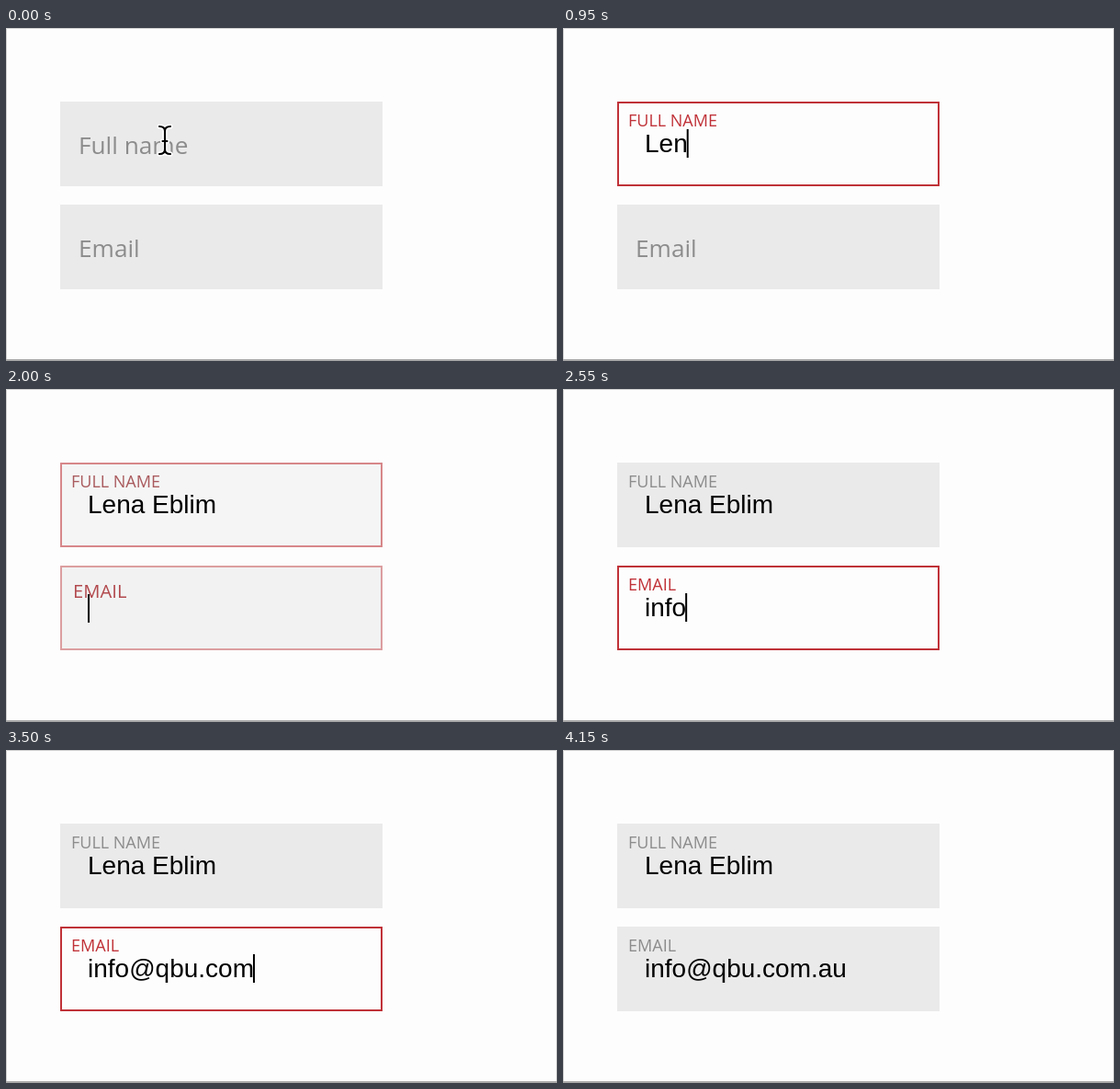
Animation, 600 px wide and 362 px high, one loop 4.4 s. Source, as an HTML page:

```html
<!DOCTYPE html>
<html lang="en">
<head>
<meta charset="utf-8">
<title>Floating form labels</title>
<style>
  html, body { margin: 0; width: 100%; height: 100%; overflow: hidden; background: #fdfdfd; }
  svg { display: block; width: 100%; height: 100%; }
  .label { font-family: "Open Sans", "Noto Sans", sans-serif; font-weight: 500; }
  .value { font: 28px "Liberation Sans", Arial, sans-serif; white-space: pre; }
  .outline { fill: none; stroke: #c03238; stroke-width: 2; }
  .beam { fill: none; stroke-linecap: round; stroke-linejoin: round; }
</style>
</head>
<body>
<svg id="stage" viewBox="0 0 600 362">
  <rect width="600" height="362" fill="#fdfdfd"/>
  <path d="M.5 362V.5H599.5V362" fill="none" stroke="#d2d2d2"/>
  <rect y="360" width="600" height="2" fill="#a9a9a9"/>
  <g id="fields"></g>
  <g id="pointer">
    <path id="beam" class="beam" stroke="#fff" stroke-width="5"
      d="M167 107Q173 107 173 112V132Q173 137 167 137M179 107Q173 107 173 112M173 132Q173 137 179 137M170.5 123H175.5"/>
    <use href="#beam"/>
    <path class="beam" stroke="#000" stroke-width="2.1"
      d="M167 107Q173 107 173 112V132Q173 137 167 137M179 107Q173 107 173 112M173 132Q173 137 179 137M170.5 123H175.5"/>
  </g>
</svg>
<script>
const LOOP = 4400, STEP = 50, FADE = 250, POINTER_HIDES = 500;
const GREY = [140, 140, 140], RED = [192, 50, 56];
const IDLE = [234, 234, 234], ACTIVE = [253, 253, 253];

const specs = [
  { y: 80, label: "Full name", text: "Lena Eblim", focus: 50, blur: 1890,
    keys: [550, 750, 950, 1100, 1200, 1350, 1450, 1550, 1650, 1750] },
  { y: 192, label: "Email", text: "info@qbu.com.au", focus: 1890, blur: 3890,
    keys: [2300, 2400, 2500, 2550, 2700, 2800, 2900, 3050, 3200, 3250, 3350, 3500, 3600, 3750, 3850] }
];

const clamp = v => Math.min(1, Math.max(0, v));
const lerp = (a, b, p) => a + (b - a) * p;
const mix = (a, b, p) => `rgb(${a.map((v, i) => Math.round(lerp(v, b[i], p)))})`;

// CSS "ease": cubic-bezier(.25, .1, .25, 1)
function ease(p) {
  const bezier = (a, b, u) => 3 * a * u * (1 - u) ** 2 + 3 * b * u * u * (1 - u) + u ** 3;
  let lo = 0, hi = 1;
  for (let i = 0; i < 20; i++) {
    const mid = (lo + hi) / 2;
    if (bezier(.25, .25, mid) < p) lo = mid; else hi = mid;
  }
  return bezier(.1, 1, lo);
}

function set(node, attrs) {
  for (const name in attrs) node.setAttribute(name, attrs[name]);
}

function add(parent, tag, attrs) {
  const node = document.createElementNS("http://www.w3.org/2000/svg", tag);
  set(node, attrs);
  return parent.appendChild(node);
}

function createField(spec) {
  const g = add(document.getElementById("fields"), "g", { transform: `translate(59 ${spec.y})` });
  return {
    ...spec,
    box: add(g, "rect", { width: 351, height: 92 }),
    outline: add(g, "rect", { class: "outline", x: 1, y: 1, width: 349, height: 90 }),
    title: add(g, "text", { class: "label" }),
    value: add(g, "text", { class: "value", x: 30, y: 55 }),
    caret: add(g, "rect", { width: 2, height: 31 })
  };
}

function drawField(f, t) {
  const opened = clamp((t - f.focus) / FADE);
  const closed = clamp((t - f.blur) / FADE);
  const active = opened - closed;
  const lift = ease(opened);

  set(f.box, { fill: mix(IDLE, ACTIVE, active) });
  set(f.outline, { opacity: active });

  f.title.textContent = opened > 0 ? f.label.toUpperCase() : f.label;
  set(f.title, {
    x: lerp(20, 12, lift),
    y: lerp(57, 27, lift),
    "font-size": lerp(26.2, 18, lift),
    fill: mix(GREY, RED, closed > 0 ? 1 - closed : lift)
  });

  const count = f.keys.filter(k => k <= t).length;
  f.value.textContent = f.text.slice(0, count);
  set(f.caret, {
    x: count ? 29 + f.value.getComputedTextLength() : 30,
    y: count ? 30 : 31,
    visibility: t > f.focus && t < f.blur ? "visible" : "hidden"
  });
}

const fields = specs.map(createField);
const pointer = document.getElementById("pointer");
const start = performance.now();

function draw() {
  const t = Math.floor(((performance.now() - start) % LOOP) / STEP) * STEP;
  fields.forEach(f => drawField(f, t));
  set(pointer, { visibility: t < POINTER_HIDES ? "visible" : "hidden" });
  requestAnimationFrame(draw);
}
draw();
</script>
</body>
</html>
```
